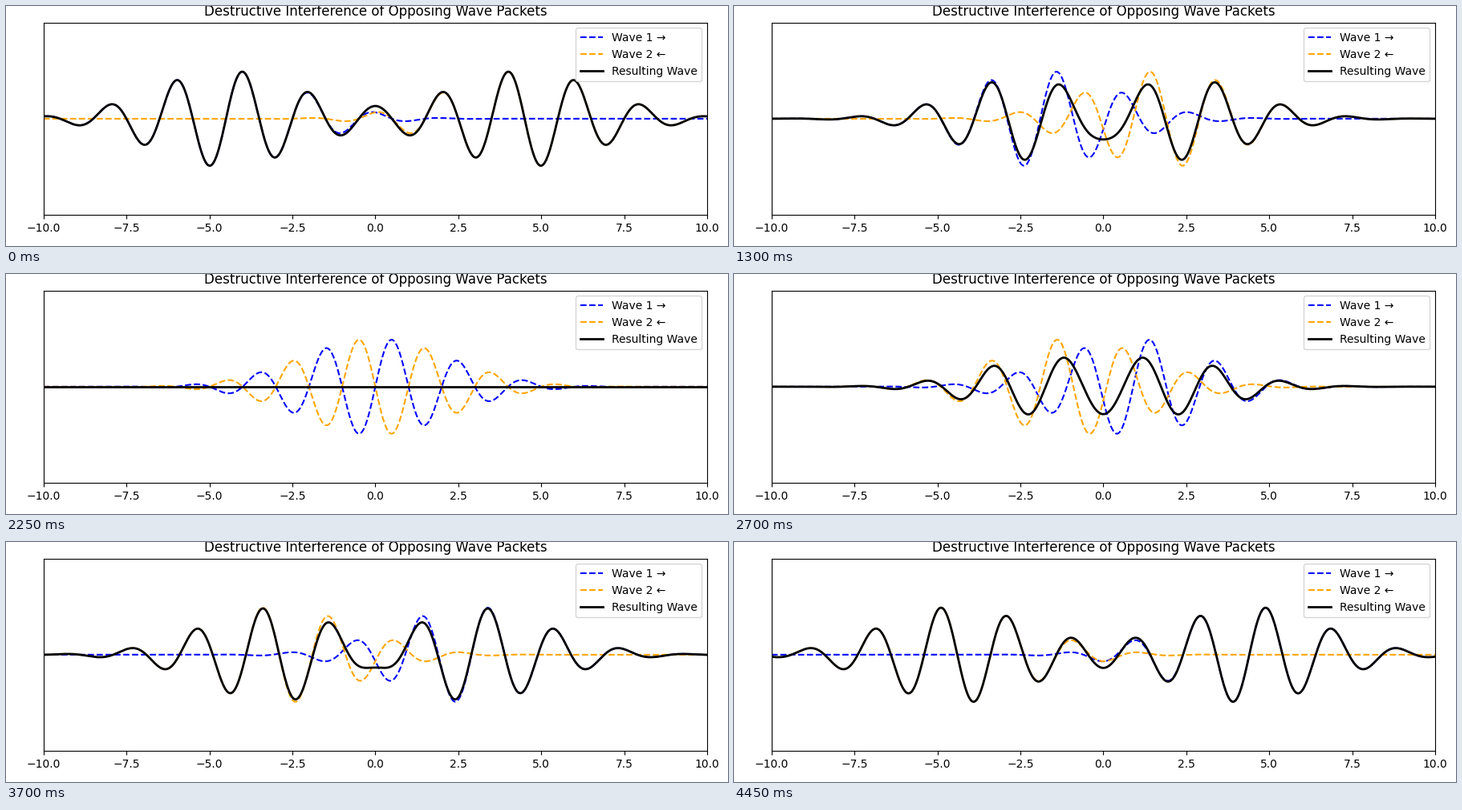
Animation of 900 by 300 pixels, one loop 4.5 s. Source, as a matplotlib script:

```python
import matplotlib.pyplot as plt
import numpy as np
from matplotlib.animation import FuncAnimation

FRAMES = 90
INTERVAL = 50
START = -4.5
STEP = 0.1

plt.rcParams["font.family"] = "DejaVu Sans"


def packet(u):
    """Sine of wavelength 2 under a Gaussian envelope."""
    return np.exp(-0.1 * u**2) * np.sin(np.pi * u)


x = np.linspace(-10, 10, 1000)

fig, ax = plt.subplots(figsize=(9, 3), dpi=100)
# Margins are fitted to the empty axes, before limits and title are set.
fig.tight_layout()

ax.set_xlim(-10, 10)
ax.set_ylim(-2, 2)
ax.set_yticks([])
ax.set_title("Destructive Interference of Opposing Wave Packets")

right_line, = ax.plot([], [], "--", color="blue", lw=1.5, label="Wave 1 →")
left_line, = ax.plot([], [], "--", color="orange", lw=1.5, label="Wave 2 ←")
sum_line, = ax.plot([], [], color="black", lw=2, label="Resulting Wave")
ax.legend(loc="upper right")


def update(frame):
    center = START + STEP * frame
    rightward = packet(x - center)
    leftward = packet(-x - center)
    right_line.set_data(x, rightward)
    left_line.set_data(x, leftward)
    sum_line.set_data(x, rightward + leftward)
    return right_line, left_line, sum_line


anim = FuncAnimation(fig, update, frames=FRAMES, interval=INTERVAL,
                     repeat=True, repeat_delay=0)
plt.show()
```
